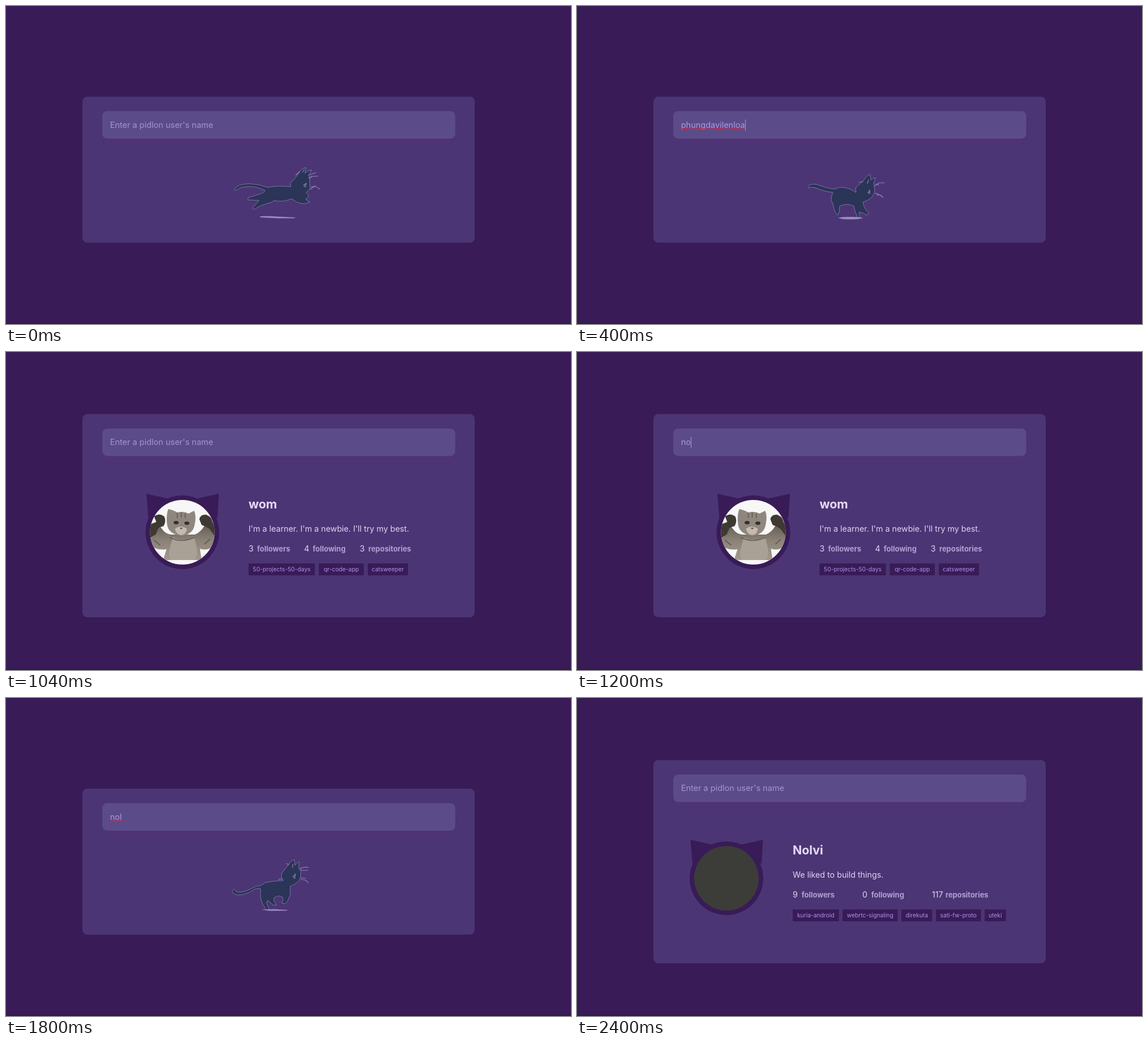
These frames come from a looping animation (998 px wide and 561 px high, 2.8 s). An HTML page:

```html
<!DOCTYPE html>
<html lang="en">
<head>
<meta charset="utf-8">
<title>Profile finder</title>
<style>
  html, body { margin: 0; width: 100%; height: 100%; overflow: hidden; background: #381b57; }
  svg { display: block; width: 100vw; height: 100vh; font-family: Inter, "Open Sans", sans-serif; }
  .field { font-size: 14.5px; fill: #a99ae0; }
  .hint { fill: #a791d6; }
  .name { font-size: 21.3px; font-weight: 700; fill: #e6dbf6; }
  .bio, .count { font-size: 14.25px; fill: #e0d5f4; }
  .label { font-size: 12.9px; font-weight: 700; fill: #b0a1d3; }
  .tag { font-size: 10.3px; fill: #ae90ea; text-anchor: middle; }
  .cat { fill: #2b3557; stroke: #8178ac; stroke-width: .9; stroke-linejoin: round; }
  .light { fill: none; stroke: #8f83b9; stroke-width: 1.2; stroke-linecap: round; }
  .shade { fill: #988bc0; }
</style>
</head>
<body>
<svg viewBox="0 0 998 561" preserveAspectRatio="none">
  <defs>
    <clipPath id="round"><circle r="57"/></clipPath>
    <filter id="glow" x="-10%" y="-50%" width="120%" height="220%"><feGaussianBlur stdDeviation="4"/></filter>
    <linearGradient id="fur" x2="0" y2="1">
      <stop offset="0" stop-color="#5f574f"/>
      <stop offset=".5" stop-color="#8c8378"/>
      <stop offset="1" stop-color="#a2998e"/>
    </linearGradient>
  </defs>
  <rect width="998" height="561" fill="#381b57"/>
  <rect y="560" width="998" height="1" fill="#2a1442"/>
  <rect id="card" x="135" width="693" rx="8.5" fill="#4c3574"/>
  <g id="search">
    <rect x="176" y="196" width="611" height="43" rx="8" fill="#5b2f78" opacity=".35" filter="url(#glow)"/>
    <rect x="170" y="185.5" width="623.5" height="48.5" rx="8.5" fill="#5c4b89"/>
    <text id="query" x="183.7" y="214.8"></text>
    <path id="squiggle" fill="none" stroke="#d3283f" stroke-width="1.1"/>
    <rect id="caret" y="200.5" width="1" height="19" fill="#a99ae0"/>
  </g>
  <g id="content"></g>
</svg>
<script>
const $ = id => document.getElementById(id);
const LOOP = 2800;
const HINT = "Enter a pidlon user's name";

const text = (cls, x, y, str) => `<text class="${cls}" x="${x}" y="${y}">${str}</text>`;

// Running cat: silhouette, whiskers and details, ground shadow
const cat = (body, lines, shadow) =>
  `<path class="cat" d="${body}"/><path class="light" d="${lines}"/><path class="shade" d="${shadow}"/>`;

const leap = cat(
  `M463 320Q446 314 430 313.5Q408 314 404 323Q405 327 409 324Q413 319 430 318.5Q446 319 458 326
   Q452 332 444 333L428 338L427 342L447 343L435 357L439 359Q446 352 470 346L473 343Q488 347 505 340
   Q513 348 527 349L537 346L529 341Q536 336 534 333L530 329Q538 324 537 317L536 303L534 299
   L540 289Q532 290 528 295L530 285Q522 286 518 294Q509 306 502 313L503 319Q482 316 463 320Z`,
  `M536 298L547 294M537 301L551 300M535 304L540 302M539 319Q548 317 554 323M538 323L546 317
   M512 298L519 292M524 293L527 288M528 319L526 316L530 313L529 319Z`,
  "M448 371L462 370.5L511 373L509 374.5L480 374.5L450 373Z");

const land = cat(
  `M455 323Q440 321 430 317Q418 312 410 316Q407 319 409 321Q417 318 427 323Q440 328 452 329
   Q449 334 449 343L452 349Q454 362 460 369L463 364L464 353Q476 347 489 353L491 362L496 374L500 374
   L498 364Q502 363 512 369L516 366Q507 358 505 346Q516 342 520 338Q526 332 526 324L524 313
   L527 303Q522 304 519 307L518 297Q511 299 506 308Q499 314 492 321L493 329Q471 314 455 323Z`,
  `M526 317L534 312L543 312M528 314L533 316M527 330L534 333L541 338M529 333L538 334
   M498 311L505 310M513 313L515 307M514 329L517 325L517 331Z`,
  "M461 374Q468 371.5 483 372Q498 371.5 506 374Q498 376.5 483 376.5Q468 376.5 461 374Z");

const push = cat(
  `M457 326Q451 332 442 332Q424 342 412 343Q405 342 402 337Q398 339 400 343Q406 349 417 347
   Q430 344 438 338Q446 334 450 337Q448 352 453 363L460 374L465 373L460 361L462 357L473 366L478 365
   Q471 357 474 352Q482 347 488 351Q491 356 487 362L493 363Q499 358 502 346L502 332Q515 328 520 318
   L521 305L517 300L518 289Q513 290 511 295L509 285Q502 287 499 294L488 308Q484 315 490 322Q468 323 457 326Z`,
  `M519 302Q525 297 534 299M520 304L533 304M521 317L529 318M521 320Q530 320 534 326
   M495 292L499 294M481 320L488 319M506 299L507 293M507 315L511 311L510 318Z`,
  "M451 373L475 372.5L498 374L495 375.3L465 375.5Z");

const kitten = `<g clip-path="url(#round)">
  <circle r="58" fill="#f8f7f7"/>
  <path fill="url(#fur)" d="M-58-14L-46-18L-36-6Q-30 3-20 4L22 4Q32 0 38-10L46-18L58-14Q62 16 51 27Q42 33 31 29L34 49H-34L-28 30Q-48 33-58 21Z"/>
  <path fill="#aaa196" d="M-17 9Q2 18 21 8L26 30Q28 43 21 49H-20Q-26 38-22 28Z"/>
  <path fill="#3f3934" d="M-50-28Q-41-35-32-28Q-28-19-33-11L-42-8L-47 4L-58 10V-12L-46-18ZM30-23Q32-32 42-31Q51-28 53-19L58-8V8L48-6Q42-10 34-13Z"/>
  <path fill="#8f877f" d="M-25-41Q-15-39-9-35Q2-38 11-33L21-38Q25-27 22-15Q20 4-2 6Q-25 3-27-14Q-29-29-25-41Z"/>
  <path fill="#c3bbb1" d="M-13-6Q-3-14 8-6Q7 4-2 5Q-11 4-13-6Z"/>
  <path fill="none" stroke="#645b53" stroke-width="1.7" d="M-9-34V-25M-2-35V-26M5-33V-25M-50 14L-39 23M49 12L39 21M-22 9Q-2 20 22 9"/>
  <ellipse cx="-11" cy="-17" rx="4.5" ry="3" fill="#35312a"/>
  <ellipse cx="8" cy="-16" rx="4.5" ry="3" fill="#35312a"/>
  <path fill="#6d4f49" d="M-5-8H1L-2-5Z"/>
</g>`;
const disc = `<circle r="57" fill="#3c3c39"/>`;

const avatar = (x, picture) => `<g transform="translate(${x} 318)">
  <path fill="#381b57" d="M-63.5-68L-20-58L-60-25ZM64.5-68L20-58L62-25Z"/>
  <circle r="65" fill="#381b57"/>${picture}</g>`;

// Stats: [count, label, x, label x]; tags: [name, x, width]
const profile = p => avatar(p.x - 117, p.picture)
  + text("name", p.x, 275.8, p.name)
  + text("bio", p.x, 317.3, p.bio)
  + p.stats.map(([n, label, x, lx]) => text("count", x, 352, n) + text("label", lx, 351.5, label)).join("")
  + p.tags.map(([tag, x, w]) =>
      `<rect x="${x}" y="373" width="${w}" height="21" fill="#381b57"/>` + text("tag", x + w / 2, 386.7, tag)).join("");

const learner = profile({
  x: 428.5, picture: kitten, name: "wom",
  bio: "I'm a learner. I'm a newbie. I'll try my best.",
  stats: [[3, "followers", 428.5, 443.5], [4, "following", 526.5, 541.7], [3, "repositories", 624.7, 640]],
  tags: [["50-projects-50-days", 428.5, 117], ["qr-code-app", 552.5, 79.5], ["catsweeper", 639, 71]]
});
const builders = profile({
  x: 381, picture: disc, name: "Nolvi",
  bio: "We liked to build things.",
  stats: [[9, "followers", 381, 396.7], [0, "following", 504, 519.7], [117, "repositories", 627, 651]],
  tags: [["kuria-android", 381, 81.5], ["webrtc-signaling", 469, 97.5], ["direkuta", 573, 54.5],
         ["sati-fw-proto", 634, 79.5], ["uteki", 720, 37.5]]
});

const scenes = [
  { at: 0, content: leap },
  { at: 400, content: land, query: "phungdavilenloa", caret: true, wavy: true },
  { at: 800, content: learner, open: true },
  { at: 1200, content: learner, open: true, query: "no", caret: true },
  { at: 1800, content: push, query: "nol", wavy: true },
  { at: 2000, content: land, query: "nolvi" },
  { at: 2400, content: builders, open: true }
];

function wave(x, width) {
  let d = `M${x} 217.5`;
  for (let i = 1; i * 2 <= width; i++) d += `L${x + i * 2} ${i % 2 ? 216 : 218}`;
  return d;
}

function show({ content, open, query, caret, wavy }) {
  $("card").setAttribute("y", open ? 109.5 : 160);
  $("card").setAttribute("height", open ? 358.5 : 257.5);
  $("search").setAttribute("transform", `translate(0 ${open ? -50.5 : 0})`);
  $("query").setAttribute("class", query ? "field" : "field hint");
  $("query").textContent = query || HINT;
  const width = $("query").getComputedTextLength();
  $("caret").setAttribute("x", Math.round(183.7 + width));
  $("caret").setAttribute("visibility", caret ? "visible" : "hidden");
  $("squiggle").setAttribute("d", wavy ? wave(184, width) : "");
  $("content").innerHTML = content;
}

let current;
function render(now) {
  const t = now % LOOP;
  const scene = scenes.findLast(s => s.at <= t);
  if (scene !== current) show(current = scene);
}

const start = performance.now();
function tick() {
  render(Math.max(0, performance.now() - start));
  requestAnimationFrame(tick);
}
tick();
</script>
</body>
</html>
```
